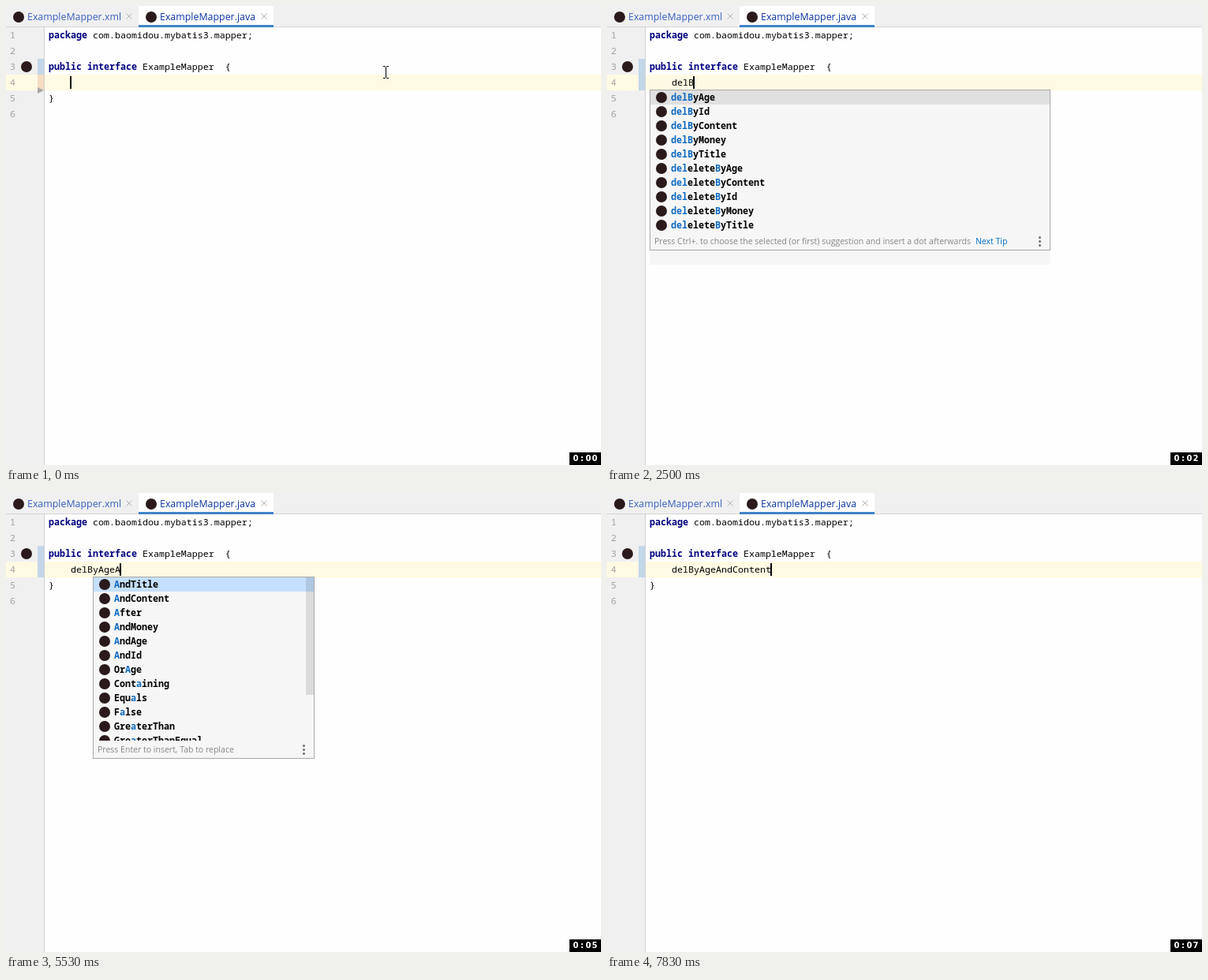
Write an HTML page that moves like this. It is 754 px wide and 582 px high and loops after 7.99 s.

```html
<!DOCTYPE html>
<html lang="en">
<head>
<meta charset="utf-8">
<title>Mapper completion</title>
<style>
html, body { margin: 0; width: 100%; height: 100%; overflow: hidden; background: #fefefe; }
#stage { position: relative; width: 754px; height: 582px; overflow: hidden; background: #fefefe;
  font: 11.667px/19px "Noto Sans Mono", "DejaVu Sans Mono", monospace; color: #000; }
#stage div, #stage svg { position: absolute; }
b { color: #000080; }
.logo { width: 14px; height: 14px; border-radius: 50%; background: #2b1a1b; }
.tab { top: 0; font: 12.38px/27px "Open Sans", "Noto Sans", sans-serif; color: #3a5fc0; white-space: pre; }
#tabs { left: 0; top: 0; width: 754px; height: 26px; background: #f0f0f0; border-bottom: 1px solid #d4d4d4; }
#active { left: 168px; top: 0; width: 171px; height: 24px; background: #fff; border-bottom: 3px solid #4083c9; }
#gutter { left: 0; top: 27px; width: 48px; height: 555px; background: #f0f0f0; }
#row { left: 0; top: 87px; width: 754px; height: 20px; background: #fffae3; }
#edge { left: 48px; top: 27px; width: 1px; height: 555px; background: #d0d0d0; }
.mark { left: 40px; width: 8px; height: 20px; background: #c3d6e8; }
.num { left: 5px; color: #a0a0a0; }
.code { left: 54px; white-space: pre; }
#typed { left: 82px; top: 87px; }
#caret { top: 89px; width: 2px; height: 16px; background: #000; }
#ghost { left: 54px; top: 310px; width: 508px; height: 18px; background: #f6f6f6; }
#popup { top: 106px; box-sizing: border-box; border: 1px solid #a9a9a9; background: #f6f6f6; }
#list { left: 0; top: 0; width: 100%; overflow: hidden; }
.item { left: 0; width: 100%; height: 18px; line-height: 17px; font-weight: bold; }
.item span { position: absolute; left: 26px; }
.item i { font-style: normal; color: #0f6ac2; }
.item .logo { left: 6.5px; top: 2px; }
#thumb { right: 0; top: 0; width: 10px; background: rgba(0, 0, 0, .11); }
#foot { left: 5px; bottom: 0; height: 22px; white-space: pre;
  font: 10.52px/22px "Open Sans", "Noto Sans", sans-serif; color: #868686; }
#foot a { margin-left: 6px; color: #0071c7; }
#dots { right: 11px; bottom: 4px; width: 3px; height: 13px; }
#clock { left: 714px; top: 566px; width: 40px; height: 16px; background: #000; color: #fff;
  font: bold 10px/16px "DejaVu Sans", sans-serif; }
#clock span { position: absolute; top: 0; width: 8px; text-align: center; }
</style>
</head>
<body>
<div id="stage">
  <div id="tabs"></div>
  <div id="active"></div>
  <div class="logo" style="left:9px;top:7px"></div>
  <div class="tab" style="left:27px">ExampleMapper.xml</div>
  <div class="logo" style="left:177px;top:7px"></div>
  <div class="tab" style="left:195px;color:#0a32a4">ExampleMapper.java</div>
  <svg width="340" height="27" style="left:0;top:0" stroke="#b4b4b4" fill="none">
    <path d="M152.5 9.5l7 7m0-7l-7 7M323.5 9.5l7 7m0-7l-7 7"/>
  </svg>
  <div id="gutter"></div>
  <div id="row"></div>
  <div id="edge"></div>
  <div class="mark" style="top:67px"></div>
  <div class="mark" id="change" style="top:87px"></div>
  <svg id="removed" width="8" height="8" style="left:40px;top:103px"><path d="M0 0L8 4L0 8z" fill="#a9a9a9"/></svg>
  <div class="logo" style="left:19px;top:70px"></div>
  <div class="code" style="top:27px"><b>package</b> com.baomidou.mybatis3.mapper;</div>
  <div class="code" style="top:67px"><b>public interface</b> ExampleMapper  {</div>
  <div class="code" style="top:107px">}</div>
  <div id="typed"></div>
  <div id="caret"></div>
  <div id="ghost"></div>
  <div id="popup">
    <div id="list"></div>
    <div id="thumb"></div>
    <div id="foot"></div>
    <svg id="dots" fill="#6e6e6e"><circle cx="1.5" cy="1.5" r="1.5"/><circle cx="1.5" cy="6.5" r="1.5"/><circle cx="1.5" cy="11.5" r="1.5"/></svg>
  </div>
  <svg id="pointer" width="9" height="16" style="left:477px;top:76px" stroke="#000" fill="none">
    <path d="M1 .5h2.5l1 1l1-1H8M4.5 1.5v13M1 15.5h2.5l1-1l1 1H8"/>
  </svg>
  <div id="clock"></div>
</div>
<script>
const LOOP = 7990;
const $ = id => document.getElementById(id);
const words = s => s.split(' ');

const methods = [
  ...words('Age Id Content Money Title').map(f => 'delBy' + f),
  ...words('Age Content Id Money Title').map(f => 'deleleteBy' + f)
];
const byAge = ['delByAge', 'deleleteByAge'];
const fields = words('AndTitle AndContent AndMoney AndAge AndId');
const fuzzy = words('AndTitle AndContent After AndMoney AndAge AndId OrAge Containing Equals False GreaterThan GreaterThanEqual');
const parts = words('AndTitle AndContent After AndMoney AndAge AndId Before Between Containing Equals False GreaterThan');

const enterTip = 'Press Enter to insert, Tab to replace';
const dotTip = 'Press Ctrl+. to choose the selected (or first) suggestion and insert a dot afterwards';

const methodMenu = (prefix, items, tip = dotTip, thumb = 0) =>
  ({ x: 54, width: 508, pick: '#e0e0e0', next: true, prefix, items, tip, thumb });
const partMenu = (prefix, items, thumb = 0, x = 110) =>
  ({ x, width: 281, pick: '#c5dffc', next: false, prefix, items, tip: enterTip, thumb });

// Each step changes part of the state from its time on.
const steps = [
  [0, { text: '', caret: true, menu: null, ghost: false, clean: true, sec: 0 }],
  [280, { caret: false }],
  [560, { text: 'd', caret: true, clean: false }],
  [680, { menu: methodMenu('d', ['default', 'double', ...methods], enterTip, 32) }],
  [980, { sec: 1 }],
  [1090, { text: 'de' }],
  [1200, { menu: methodMenu('de', ['default', ...methods], enterTip) }],
  [1350, { text: 'del' }],
  [1470, { menu: methodMenu('del', methods, enterTip), ghost: true }],
  [2070, { sec: 2 }],
  [2370, { text: 'delB' }],
  [2500, { menu: methodMenu('delB', methods) }],
  [3030, { text: 'delBy', sec: 3 }],
  [3150, { menu: methodMenu('delBy', methods) }],
  [3710, { text: 'delByA' }],
  [3860, { menu: methodMenu('delByA', byAge) }],
  [4010, { text: 'delByAg', sec: 4 }],
  [4130, { menu: methodMenu('delByAg', byAge) }],
  [4400, { text: 'delByAge', menu: methodMenu('delByAge', byAge) }],
  [4830, { menu: null, ghost: false }],
  [4950, { menu: partMenu('', parts, 70), sec: 5 }],
  [5380, { caret: false }],
  [5530, { text: 'delByAgeA', caret: true, menu: partMenu('A', fuzzy, 149) }],
  [5810, { text: 'delByAgeAn' }],
  [5920, { text: 'delByAgeAnd', sec: 6 }],
  [6030, { menu: partMenu('And', fields) }],
  [6460, { text: 'delByAgeAndC' }],
  [6590, { menu: partMenu('AndC', ['AndContent']) }],
  [6990, { menu: null, sec: 7 }],
  [7090, { text: 'delByAgeAndContent' }],
  [7240, { menu: partMenu('', parts, 70, 180) }],
  [7830, { menu: null }]
];

// Colours the letters of the word that match the prefix in order.
function highlight(word, prefix) {
  let n = 0;
  return [...word].map(c => {
    const hit = n < prefix.length && c.toLowerCase() === prefix[n].toLowerCase();
    if (hit) n++;
    return hit ? `<i>${c}</i>` : c;
  }).join('');
}

function showMenu(menu) {
  const popup = $('popup');
  popup.style.display = menu ? '' : 'none';
  if (!menu) return;
  const height = Math.min(menu.items.length * 18, 207);
  popup.style.left = menu.x + 'px';
  popup.style.width = menu.width + 'px';
  popup.style.height = height + 24 + 'px';
  $('list').style.height = height + 'px';
  $('list').innerHTML = menu.items.slice(0, 12).map((word, i) => {
    const logo = /^(default|double)$/.test(word) ? '' : '<div class="logo"></div>';
    const fill = i ? '' : `;background:${menu.pick}`;
    return `<div class="item" style="top:${i * 18}px${fill}">${logo}<span>${highlight(word, menu.prefix)}</span></div>`;
  }).join('');
  $('thumb').style.height = menu.thumb + 'px';
  $('foot').innerHTML = menu.tip + (menu.next ? '<a>Next Tip</a>' : '');
}

function show(state) {
  const toggle = (id, on) => { $(id).style.display = on ? '' : 'none'; };
  $('typed').textContent = state.text;
  $('caret').style.left = 81 + 7 * state.text.length + 'px';
  toggle('caret', state.caret);
  toggle('ghost', state.ghost);
  toggle('pointer', state.clean);
  toggle('removed', state.clean);
  $('change').style.background = state.clean ? '#f3dcc2' : '#c3d6e8';
  $('clock').innerHTML = [...`0:0${state.sec}`]
    .map((c, i) => `<span style="left:${4 + i * 8}px">${c}</span>`).join('');
  showMenu(state.menu);
}

for (let i = 1; i <= 6; i++) {
  $('typed').insertAdjacentHTML('beforebegin', `<div class="num" style="top:${7 + i * 20}px">${i}</div>`);
}

const start = performance.now();
let current = -1;
function tick() {
  const t = (performance.now() - start) % LOOP;
  const count = steps.filter(([at]) => at <= t).length;
  if (count !== current) {
    current = count;
    show(Object.assign({}, ...steps.slice(0, count).map(([, patch]) => patch)));
  }
  requestAnimationFrame(tick);
}
tick();
</script>
</body>
</html>
```
